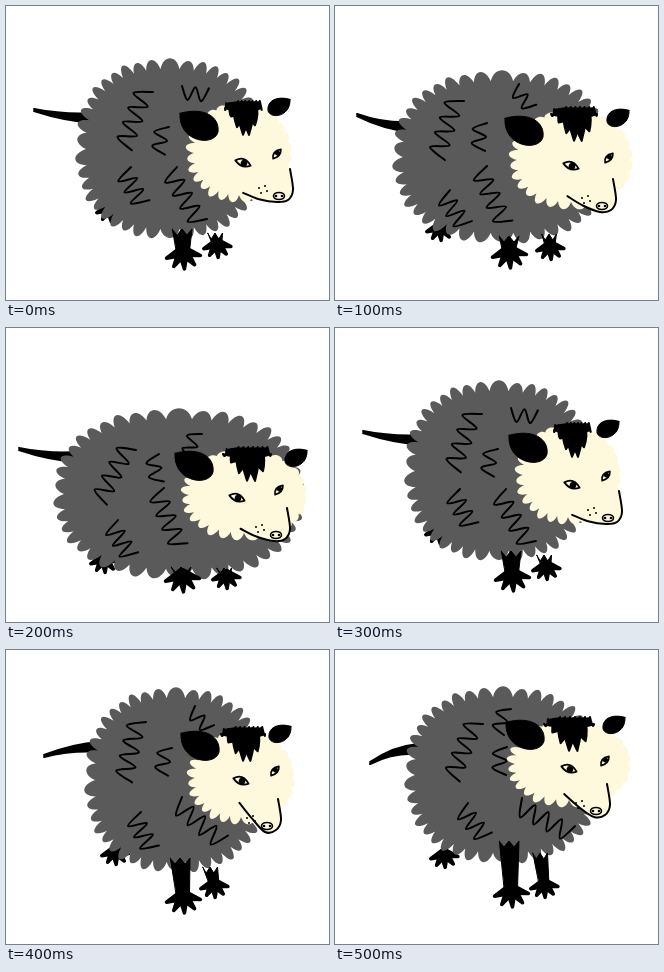
An HTML page with a canvas that plays this animation: 323x294 px, repeating every 600 ms.

```html
<!DOCTYPE html>
<html>
<head>
<meta charset="utf-8">
<title>Opossum</title>
<style>
html, body { margin: 0; width: 100%; height: 100%; overflow: hidden; background: #fff; }
canvas { display: block; }
</style>
</head>
<body>
<canvas id="stage" width="323" height="294"></canvas>
<script>
const ctx = document.getElementById('stage').getContext('2d');
const GREY = '#5a5a5a', CREAM = '#fef8dc', BLACK = '#000';
const STEP = 100, RAD = Math.PI / 180;
ctx.lineCap = ctx.lineJoin = 'round';

// body, skull: centre and radii. tail: tip, root. legs: top, ankle.
// hair: top centre, width. jaw: slope in degrees. curls: start, degrees.
const stand = {
  body: [164, 143, 94, 90], skull: [233, 147, 53, 50], tail: [28, 104, 89, 112],
  back: [104, 201], legs: [[176, 223, 177, 245], [209, 227, 211, 237]],
  hair: [237, 96, 36], ears: [[193, 120], [273, 101]], eyes: [[237, 157], [271, 148]],
  nose: [273, 190], jaw: 5,
  curls: [[147, 86, 110], [176, 80, 5], [163, 121, 98], [125, 161, 61], [171, 161, 60]]
};
const lower = {
  body: [167, 151, 109, 86], skull: [236, 154, 62, 50], tail: [22, 109, 78, 121],
  back: [105, 220], legs: [[174, 230, 174, 244], [214, 228, 215, 239]],
  hair: [239, 102, 46], ears: [[189, 125], [283, 112]], eyes: [[236, 160], [274, 152]],
  nose: [267, 200], jaw: 16,
  curls: [[129, 95, 108], [184, 78, 50], [152, 117, 94], [115, 184, 55], [152, 160, 65]]
};
const crouch = {
  body: [173, 166, 125, 85], skull: [238, 167, 63, 46], tail: [13, 121, 72, 129],
  back: [98, 230], legs: [[175, 239, 176, 246], [218, 240, 220, 246]],
  hair: [241, 120, 48], ears: [[188, 138], [290, 130]], eyes: [[231, 170], [273, 162]],
  nose: [270, 207], jaw: 10,
  curls: [[130, 122, 118], [196, 106, 110], [153, 126, 80], [112, 192, 58], [158, 160, 67]]
};
const rise = {
  body: [170, 130, 91, 92], skull: [235, 128, 54, 47], tail: [38, 106, 94, 97],
  back: [109, 200], legs: [[174, 208, 177, 245], [204, 217, 208, 233]],
  hair: [237, 78, 44], ears: [[194, 96], [274, 84]], eyes: [[235, 131], [269, 121]],
  nose: [261, 176], jaw: 40,
  curls: [[140, 72, 103], [189, 56, 45], [166, 98, 98], [135, 162, 62], [176, 147, 40]]
};
const tall = {
  body: [168, 125, 98, 88], skull: [234, 114, 62, 44], tail: [35, 113, 83, 99],
  back: [109, 203], legs: [[174, 191, 176, 239], [205, 203, 209, 233]],
  hair: [234, 68, 50], ears: [[190, 85], [279, 75]], eyes: [[234, 119], [270, 111]],
  nose: [261, 161], jaw: 28,
  curls: [[148, 74, 112], [176, 59, 105], [172, 97, 92], [133, 153, 51], [187, 148, 28]]
};
const poses = [stand, lower, crouch, stand, rise, tall];
const curlLengths = [62, 27, 28, 38, 60];

function fill(color, edge) {
  ctx.fillStyle = color;
  ctx.fill();
  if (edge) stroke(color, edge);
}

function stroke(color, width) {
  ctx.strokeStyle = color;
  ctx.lineWidth = width;
  ctx.stroke();
}

function polygon(points, color, edge) {
  ctx.beginPath();
  points.forEach(p => ctx.lineTo(...p));
  ctx.closePath();
  fill(color, edge);
}

function oval(x, y, rx, ry = rx) {
  ctx.beginPath();
  ctx.ellipse(x, y, rx, ry, 0, 0, 2 * Math.PI);
}

// Smooth curve through points, added to the current path.
function curve(p) {
  const at = i => p[Math.min(p.length - 1, Math.max(0, i))];
  ctx.lineTo(...p[0]);
  for (let i = 0; i < p.length - 1; i++) {
    const [a, b, c, d] = [at(i - 1), at(i), at(i + 1), at(i + 2)];
    ctx.bezierCurveTo(b[0] + (c[0] - a[0]) / 6, b[1] + (c[1] - a[1]) / 6,
      c[0] - (d[0] - b[0]) / 6, c[1] - (d[1] - b[1]) / 6, ...c);
  }
}

// Rounded tufts of fur around a slightly squared ellipse.
function fur([cx, cy, rx, ry], count, power, depth, color) {
  const bend = v => Math.sign(v) * Math.abs(v) ** power;
  const at = (a, out) => [cx + (rx + out) * bend(Math.cos(a)), cy + (ry + out) * bend(Math.sin(a))];
  const step = 2 * Math.PI / count;
  ctx.beginPath();
  ctx.moveTo(...at(0, -depth(0)));
  for (let i = 0; i < count; i++) {
    const a = i * step, b = a + step, out = depth(a) * (.33 + .15 * Math.sin(i * 2.3));
    ctx.bezierCurveTo(...at(a + step * .22, out), ...at(b - step * .22, out), ...at(b, -depth(b)));
  }
  fill(color);
}

function curl([x, y, deg], length) {
  const c = Math.cos(deg * RAD), s = Math.sin(deg * RAD);
  const n = 2 * Math.ceil(length / 16), w = Math.min(18, length / 2), points = [];
  for (let i = 0; i <= n; i++) {
    const d = length * i / n, side = i % 2 * w;
    points.push([x + c * d - s * side, y + s * d + c * side]);
  }
  ctx.beginPath();
  curve(points);
  stroke(BLACK, 2);
}

function tail([x0, y0, x1, y1]) {
  const mid = (x0 + x1) / 2;
  ctx.beginPath();
  ctx.moveTo(x0, y0 - 1);
  ctx.quadraticCurveTo(mid, y1 - 3, x1, y1 - 5);
  ctx.lineTo(x1, y1 + 5);
  ctx.quadraticCurveTo(mid, y1 + 3, x0, y0 + 1);
  fill(BLACK, 2);
}

function foot(x, y, reach) {
  for (let i = 0; i < 5; i++) {
    const a = .25 + i * .62, c = Math.cos(a), s = Math.sin(a), w = reach * .22;
    polygon([[x - s * w, y + c * w], [x + c * reach * .9, y + s * reach * .9],
      [x + s * w, y - c * w]], BLACK, 3.5);
  }
}

function leg([x0, y0, x1, y1], w, reach) {
  const h = w / 2;
  polygon([[x0 - h, y0], [x0 - h / 2, y0 + 6], [x0, y0], [x0 + h / 2, y0 + 6], [x0 + h, y0],
    [x1 + h * .65, y1], [x1 - h * .65, y1]], BLACK, 1);
  foot(x1, y1, reach);
}

function ear([x, y], rx, ry) {
  ctx.save();
  ctx.translate(x, y);
  ctx.scale(rx, ry);
  ctx.beginPath();
  ctx.moveTo(-1, -.85);
  ctx.bezierCurveTo(.3, -1.3, 1.1, -.6, 1, .4);
  ctx.bezierCurveTo(.8, 1.4, -1.1, 1.1, -1, -.85);
  ctx.restore();
  fill(BLACK, 1);
}

// Overlapping locks fan out from the top, the longest right of the middle.
function hair([x, y, w]) {
  for (let i = 0; i <= 6; i++) {
    const t = i / 6, root = x + (t - .5) * w * .6;
    const tipX = x + (t - .5) * w, tipY = y + 6 + 28 * Math.sin(Math.PI * t ** 1.3);
    ctx.beginPath();
    ctx.moveTo(root - 6, y + 1);
    ctx.quadraticCurveTo(root - 7, y + 12, tipX, tipY);
    ctx.quadraticCurveTo(root + 9, y + 12, root + 6, y - 1);
    fill(BLACK, 2);
  }
}

function eye([x, y], r, deg) {
  ctx.save();
  ctx.translate(x, y);
  ctx.rotate(deg * RAD);
  ctx.beginPath();
  ctx.moveTo(-r, -1);
  ctx.quadraticCurveTo(0, -r, r, 1);
  ctx.quadraticCurveTo(0, r * .8, -r, -1);
  stroke(BLACK, 1.8);
  oval(1, 0, r * .42);
  fill(BLACK);
  ctx.restore();
}

function muzzle([x, y], jaw, [cx, cy]) {
  const c = Math.cos(jaw * RAD), s = Math.sin(jaw * RAD);
  const lip = [[-36 * c, -36 * s], [-20 * c, 5 - 20 * s], [-2, 6], [9, 4], [14, -6], [11, -27]]
    .map(([dx, dy]) => [x + dx, y + dy]);
  ctx.beginPath();
  ctx.moveTo(cx, cy);
  curve(lip);
  fill(CREAM);
  ctx.beginPath();
  curve(lip);
  stroke(BLACK, 2);

  oval(x, y, 5.5, 3.5);
  stroke(BLACK, 1.6);
  for (const side of [-3, 3]) {
    oval(x + side, y, 1.3);
    fill(BLACK);
  }
  for (let i = 0; i < 4; i++) {
    const right = i % 2, low = i >> 1;
    oval(x - 20 + right * 6 + low * 2, y - 8 - right * 2 + low * 5, 1);
    fill(BLACK);
  }
}

function draw(pose) {
  ctx.fillStyle = '#fff';
  ctx.fillRect(0, 0, 323, 294);
  tail(pose.tail);
  foot(...pose.back, 16);
  fur(pose.body, 42, .84, () => 10, GREY);
  leg(pose.legs[0], 20, 20);
  leg(pose.legs[1], 15, 16);
  pose.curls.forEach((c, i) => curl(c, curlLengths[i]));

  // The cheek on the near side is shaggier than the crown.
  fur(pose.skull, 28, .95, a => Math.cos(a) < .2 && Math.sin(a) > -.5 ? 8 : 3, CREAM);
  muzzle(pose.nose, pose.jaw, pose.skull);
  hair(pose.hair);
  ear(pose.ears[0], 19, 15);
  ear(pose.ears[1], -11, 9);
  eye(pose.eyes[0], 8, 12);
  eye(pose.eyes[1], 6, -60);
}

function tick(now) {
  draw(poses[Math.floor(now / STEP) % poses.length]);
  requestAnimationFrame(tick);
}
tick(performance.now());
</script>
</body>
</html>
```
